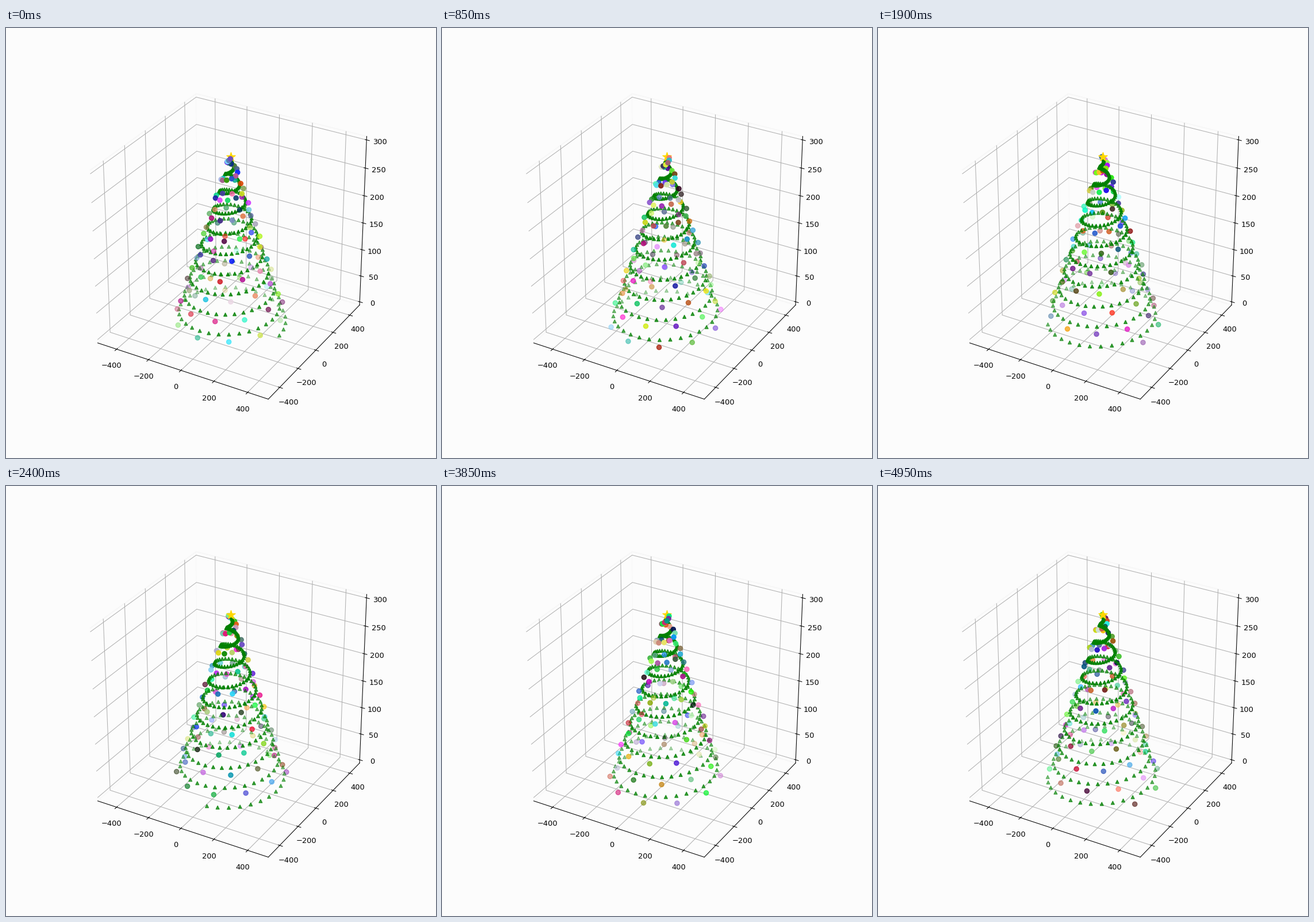
A matplotlib script for the animation above (5 s loop, 748 by 748 pixels).

```python
import random

import matplotlib.pyplot as plt
import numpy as np
from matplotlib.animation import FuncAnimation

FRAMES = 100
INTERVAL = 50
HEIGHT = 300
PAPER = "#fcfcfc"

fig = plt.figure(figsize=(8, 8), dpi=93.5, facecolor=PAPER)
ax = fig.add_subplot(projection="3d", facecolor=PAPER)


def padded(low, high):
    """Limits widened by 1/48 of the range on both sides."""
    pad = (high - low) / 48
    return low - pad, high + pad


def setup_axes():
    ax.set_box_aspect((1, 1, 1))
    ax.set_xticks(range(-400, 401, 200))
    ax.set_yticks(range(-400, 401, 200))
    ax.set_zticks(range(0, HEIGHT + 1, 50))
    ax.set_xlim(*padded(-500, 500))
    ax.set_ylim(*padded(-500, 500))
    ax.set_zlim(*padded(0, HEIGHT))
    for axis in (ax.xaxis, ax.yaxis, ax.zaxis):
        axis.set_pane_color(PAPER)
        axis.pane.set_edgecolor("#f5f5f5")


def spiral(steps, turn, extra=0):
    """Points of a cone-shaped spiral, one unit of height per step."""
    angle = steps / 5 + turn
    radius = HEIGHT - steps + extra
    return radius * np.cos(angle), radius * np.sin(angle), steps


def draw(frame):
    for old in list(ax.collections):
        old.remove()
    rng = random.Random(frame)
    turn = frame / 10

    ax.scatter(*spiral(np.arange(HEIGHT), turn), c="green", marker="^")

    bauble_steps = np.arange(1, HEIGHT, 3)
    colors = [(rng.random(), rng.random(), rng.random()) for _ in bauble_steps]
    ax.scatter(*spiral(bauble_steps, turn + 2, extra=10), c=colors, marker="o", s=40)

    ax.scatter([0], [0], [HEIGHT], c="gold", marker="*", s=150)
    return ax.collections


setup_axes()
anim = FuncAnimation(fig, draw, frames=FRAMES, interval=INTERVAL,
                     repeat=True, repeat_delay=0, blit=False)
plt.show()
```
